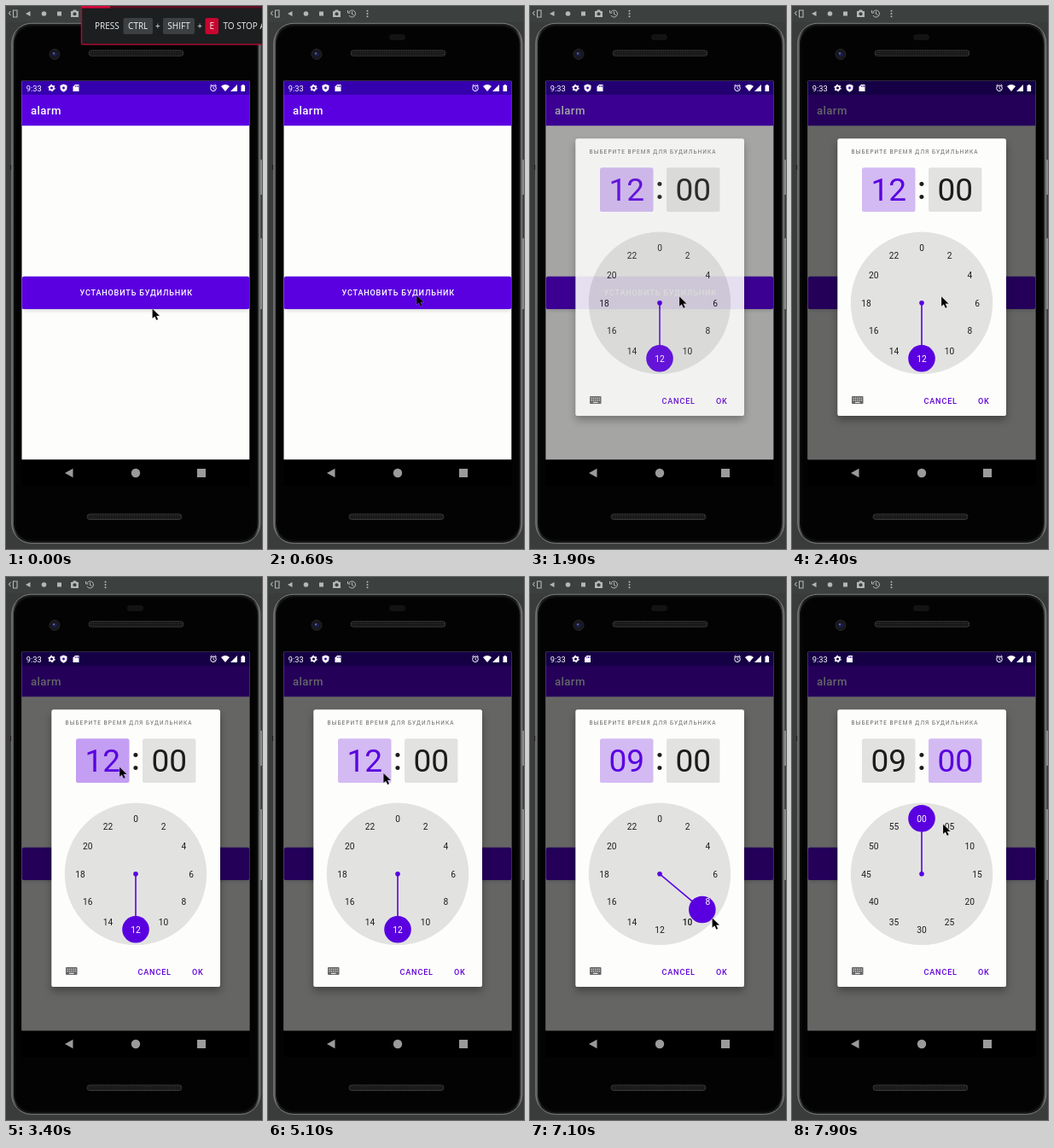
An HTML page for the animation above (8 s loop, 300 by 636 pixels).

```html
<!DOCTYPE html>
<html lang="ru">
<head>
<meta charset="utf-8">
<title>alarm</title>
<style>
  html, body { margin: 0; width: 100%; height: 100%; overflow: hidden; background: #393c3a; }
  svg { display: block; width: 300px; height: 636px; }
  text { font-family: Roboto, sans-serif; }
  .mid { text-anchor: middle; }
  .caps { font-size: 9.1px; font-weight: 500; letter-spacing: .81px; }
  .digits { font-size: 37px; text-anchor: middle; }
  .dial text { font-size: 10.2px; text-anchor: middle; }
  .banner text { font: 10px "Open Sans", sans-serif; fill: #f2f2f2; }
  #dialog { filter: drop-shadow(0 5px 5px rgba(0, 0, 0, .32)); }
</style>
</head>
<body>
<svg viewBox="0 0 300 636" xmlns="http://www.w3.org/2000/svg">
  <defs>
    <linearGradient id="rim" x1="0" y1="0" x2="1" y2="0">
      <stop offset="0" stop-color="#606361"/>
      <stop offset=".025" stop-color="#1c1d1d"/>
      <stop offset=".975" stop-color="#1c1d1d"/>
      <stop offset="1" stop-color="#666967"/>
    </linearGradient>
    <pattern id="mesh" width="2" height="2" patternUnits="userSpaceOnUse">
      <rect width="2" height="2" fill="#111"/>
      <rect width="1" height="1" fill="#3c3c3c"/>
    </pattern>
    <clipPath id="btnClip"><rect x="18.700" y="316.800" width="266.600" height="38.200" rx="2.600"/></clipPath>
    <clipPath id="knobClip"><circle id="knobHole" r="15.800"/></clipPath>
  </defs>

  <!-- emulator toolbar -->
  <rect width="300" height="636" fill="#393c3a"/>
  <rect width="300" height="19" fill="#3c403e"/>
  <g fill="#b4b6b8">
    <path d="M8.500 5h4.500v8h-4.500zM5.500 6l-2 2.500 2 2.500" fill="none" stroke="#b4b6b8" stroke-width="1.100"/>
    <path d="M23 9l5.500-3v6z"/>
    <circle cx="44.500" cy="9" r="2.800"/>
    <rect x="60" y="6.500" width="5" height="5"/>
    <path d="M76 6h2l1-1.500h3l1 1.500h2v7h-9z"/>
    <circle cx="80.500" cy="9.300" r="2" fill="#3c403e"/>
    <path d="M95 7a4 4 0 1 1 0 4M93.500 5v3h3M98.500 6.500v3l2 1" fill="none" stroke="#b4b6b8"/>
    <circle cx="116.500" cy="5.700" r="1"/><circle cx="116.500" cy="9" r="1"/><circle cx="116.500" cy="12.300" r="1"/>
  </g>

  <!-- phone -->
  <rect x="296" y="180" width="4" height="41" fill="#8a8c8b"/>
  <rect x="296" y="272" width="4" height="83" fill="#8a8c8b"/>
  <rect x="5" y="186" width="4" height="6" fill="#1d1d1d"/>
  <rect x="6.800" y="20.300" width="291" height="609" rx="23" fill="url(#rim)" stroke="#7e817f"/>
  <rect x="9.500" y="23" width="285.500" height="604" rx="21" fill="#060606" stroke="#111"/>
  <rect x="12" y="26" width="280.500" height="598" rx="18" fill="#030303"/>
  <rect x="142" y="33" width="19" height="7" rx="3.500" fill="#131314"/>
  <circle cx="57" cy="56.500" r="6" fill="#17181c" stroke="#24262a"/>
  <circle cx="57" cy="56.500" r="2.800" fill="#1c1d4a"/>
  <circle cx="56" cy="55.500" r="1" fill="#777cc0"/>
  <rect x="97" y="52" width="111" height="6.500" rx="3.200" fill="url(#mesh)" stroke="#333"/>
  <rect x="95" y="595" width="111" height="6.500" rx="3.200" fill="url(#mesh)" stroke="#333"/>
  <rect x="18.500" y="88" width="267" height="474" fill="#000"/>
  <g fill="#9b9b9b">
    <path d="M69 547l9.500-5.300v10.600z"/>
    <circle cx="152" cy="547" r="5.200"/>
    <rect x="224" y="542" width="10" height="10"/>
  </g>

  <!-- app -->
  <rect x="18.500" y="87.800" width="266.800" height="443.400" fill="#fdfefc"/>
  <rect x="18.500" y="87.800" width="266.800" height="16.200" fill="#3500ae"/>
  <rect x="18.500" y="104" width="266.800" height="36.200" fill="#5a00e0"/>
  <text x="29" y="126.800" font-size="13.200" font-weight="500" letter-spacing=".400" fill="#fff">alarm</text>
  <rect id="lift" x="20" y="319" width="264.500" height="38" rx="3" fill="#000" style="filter:blur(2px)"/>
  <rect x="18.700" y="316.800" width="266.600" height="38.200" rx="2.600" fill="#5a00e0"/>
  <g clip-path="url(#btnClip)"><circle id="ripple" cx="175" cy="340" fill="#f08ffc"/></g>
  <text class="mid caps" x="152.700" y="339.300" fill="#fff">УСТАНОВИТЬ БУДИЛЬНИК</text>
  <rect id="dim" x="18.500" y="87.800" width="266.800" height="443.400" fill="#000"/>

  <!-- status bar -->
  <g fill="#fff">
    <text x="23.800" y="99.500" font-size="9.300">9:33</text>
    <circle cx="53.500" cy="96" r="2.400" fill="none" stroke="#fff" stroke-width="1.700"/>
    <circle cx="53.500" cy="96" r="3.600" fill="none" stroke="#fff" stroke-width="1.200" stroke-dasharray="1.880 1.890"/>
    <g id="shield">
      <path d="M67.500 91.500l4 1.500v3q0 3-4 4.800q-4-1.800-4-4.800v-3z"/>
      <circle cx="67.500" cy="96" r="1.400" fill="#3500ae"/>
    </g>
    <g id="card">
      <path d="M81 92h4.500v8h-7v-5.500z"/>
      <path d="M81.300 93v2M83 93v2M84.500 93v2" stroke="#3500ae" stroke-width=".700"/>
    </g>
    <circle cx="243" cy="96.300" r="3.300" fill="none" stroke="#fff"/>
    <path d="M243 94.300v2.200l1.500 1M239.300 93.500l2-1.700M246.700 93.500l-2-1.700" fill="none" stroke="#fff" stroke-width=".900"/>
    <path d="M252 94q5-4 10 0l-5 6z"/>
    <path d="M263 100l8-8v8z"/>
    <path d="M275.500 93h1.300v-1h2v1h1.300v7h-4.600z"/>
  </g>

  <!-- time picker -->
  <g id="dialog">
    <rect x="53.300" y="155.300" width="197.700" height="324.700" rx="2.600" fill="#fdfefc"/>
    <text x="69.600" y="173" font-size="6.500" letter-spacing="1.080" fill="#666">ВЫБЕРИТЕ ВРЕМЯ ДЛЯ БУДИЛЬНИКА</text>
    <rect id="hourChip" x="82" y="189.300" width="62.500" height="51.700" rx="2.600"/>
    <rect id="minChip" x="160" y="189.300" width="62.500" height="51.700" rx="2.600"/>
    <text id="hour" class="digits" x="113.300" y="228.300"></text>
    <text class="digits" x="152" y="225.500" font-weight="500" fill="#1c1c1c">:</text>
    <text id="minute" class="digits" x="191.200" y="228.300">00</text>
    <circle cx="152" cy="347.800" r="83.200" fill="#e2e3e1"/>
    <g id="under" class="dial" fill="#1c1c1c"></g>
    <g fill="#5a00e0">
      <line id="hand" x1="152" y1="347.800" stroke="#5a00e0" stroke-width="1.600"/>
      <circle cx="152" cy="347.800" r="2.800"/>
      <circle id="knob" r="15.800"/>
    </g>
    <g clip-path="url(#knobClip)"><g id="over" class="dial" fill="#fff"></g></g>
    <rect x="70" y="457" width="13.500" height="9" rx="1" fill="#686868"/>
    <path d="M71.500 459.300h10.500M71.500 461.700h10.500" stroke="#fdfefc" stroke-width="1.100" stroke-dasharray="1.200 1.100"/>
    <path d="M74 464.300h5.500" stroke="#fdfefc"/>
    <g class="caps" fill="#6000d8">
      <text x="154.500" y="466.200">CANCEL</text>
      <text x="218" y="466.200">OK</text>
    </g>
  </g>

  <path id="cursor" d="M0 0v11.500l2.800-2.300 2 4.300 2-.900-2-4.200h3.900z" fill="#000" stroke="#fff" stroke-opacity=".500" stroke-width=".400"/>

  <g id="banner" class="banner">
    <rect x="88.500" y="0" width="220" height="45" rx="2" fill="#1c1e20" stroke="#a80d31" stroke-width="1.500"/>
    <rect x="88" width="212" height="2.500" fill="#5e0c20"/>
    <rect x="88" width="34" height="2.500" fill="#d8083a"/>
    <rect x="137.500" y="14" width="34.500" height="19" rx="2" fill="#3c4042"/>
    <rect x="184" y="14" width="37" height="19" rx="2" fill="#3c4042"/>
    <rect x="233.500" y="14" width="15.500" height="19" rx="2" fill="#c8062f"/>
    <text x="104" y="27">PRESS</text>
    <text class="mid" x="154.700" y="27">CTRL</text>
    <text class="mid" x="177.800" y="27">+</text>
    <text class="mid" x="202.500" y="27">SHIFT</text>
    <text class="mid" x="227" y="27">+</text>
    <text class="mid" x="241.300" y="27">E</text>
    <text x="254.500" y="27">TO STOP AND</text>
  </g>
</svg>
<script>
const LOOP = 8000, STEP = 100;
const CX = 152, CY = 347.8, R = 65;
const PRESS = 6100, RELEASE = 7300;
const $ = id => document.getElementById(id);
const set = (id, attrs) => {
  for (const k in attrs) $(id).setAttribute(k, attrs[k]);
};

// Each row: time, then one or more values.
const tracks = {
  cursor: [[0, 171.5, 354.5], [100, 232, 200], [200, 283, 42], [500, 283, 42],
    [600, 174, 338.5], [1300, 174, 338.5], [1400, 175, 340.3], [2600, 175, 340.3],
    [3200, 133, 222.5], [3500, 133, 222.5], [4000, 135.3, 229.7], [5100, 135.3, 229.7],
    [5500, 154, 424], [6100, 154, 424], [6500, 183, 420],
    [7000, 213.5, 399.3], [7500, 213.5, 399.3], [7800, 197, 338], [7900, 177, 289.5]],
  rippleSize: [[1300, 0], [1400, 40], [1600, 165]],
  rippleFade: [[1300, 0], [1400, .28], [1700, .28], [1900, 0]],
  lift: [[1300, .15], [1600, .32], [1700, .32], [1900, .15]],
  dim: [[1700, 0], [1800, .1], [1900, .35], [2000, .52], [2200, .6]],
  dialog: [[1700, 0], [1800, .35], [1900, .88], [2000, 1]],
  chip: [[3200, 0], [3400, 1], [3600, 1], [4000, 0]],
  shield: [[5600, 1], [5900, 0]],
  cardShift: [[5600, 0], [5900, -14.5]],
  turn: [[RELEASE, 135], [RELEASE + 200, 0]]
};

function at(name, t) {
  const keys = tracks[name];
  let i = keys.findIndex(k => k[0] > t);
  if (i < 0) i = keys.length;
  const a = keys[Math.max(i - 1, 0)], b = keys[Math.min(i, keys.length - 1)];
  const p = b[0] > a[0] ? (t - a[0]) / (b[0] - a[0]) : 0;
  const v = a.slice(1).map((n, j) => n + (b[j + 1] - n) * p);
  return v.length > 1 ? v : v[0];
}

const onDial = deg => {
  const r = deg * Math.PI / 180;
  return [CX + R * Math.sin(r), CY - R * Math.cos(r)];
};
const pad = n => String(n).padStart(2, "0");

const labels = ["under", "over"].flatMap(id => Array.from({ length: 12 }, (_, i) => {
  const node = document.createElementNS("http://www.w3.org/2000/svg", "text");
  const [x, y] = onDial(i * 30);
  node.setAttribute("x", x);
  node.setAttribute("y", y + 4);
  $(id).append(node);
  return { node, i, x, y };
}));

function handAngle(t, x, y) {
  if (t < PRESS) return 180;
  if (t >= RELEASE) return at("turn", t);
  return Math.atan2(x - CX, CY - y) * 180 / Math.PI;
}

function drawPicker(t, x, y) {
  const deg = handAngle(t, x, y), minutes = t >= RELEASE;
  const [kx, ky] = onDial(deg);
  set("hand", { x2: kx, y2: ky });
  for (const id of ["knob", "knobHole"]) set(id, { cx: kx, cy: ky });
  for (const l of labels) {
    const d = Math.hypot(l.x - kx, l.y - ky);
    l.node.textContent = minutes ? pad(l.i * 5) : l.i * 2;
    l.node.setAttribute("font-weight", d > 15 && d < 23.5 ? 500 : 400);
  }
  $("hour").textContent = pad(minutes ? 9 : Math.round(deg / 15));
  const p = at("chip", t);
  const on = `rgb(${211 - 16 * p},${186 - 28 * p},${243 - p})`;
  set("hourChip", { fill: minutes ? "#e2e3e1" : on });
  set("minChip", { fill: minutes ? on : "#e2e3e1" });
  set("hour", { fill: minutes ? "#1c1c1c" : "#5a00e0" });
  set("minute", { fill: minutes ? "#5a00e0" : "#1c1c1c" });
}

function draw(t) {
  const [x, y] = at("cursor", t);
  set("cursor", { transform: `translate(${x} ${y})` });
  set("banner", { visibility: t < 600 ? "visible" : "hidden" });
  set("ripple", { r: at("rippleSize", t), opacity: at("rippleFade", t) });
  set("card", { transform: `translate(${at("cardShift", t)} 0)` });
  for (const id of ["lift", "dim", "dialog", "shield"]) set(id, { opacity: at(id, t) });
  drawPicker(t, x, y);
}

function frame() {
  const t = performance.now() % LOOP;
  draw(Math.floor(t / STEP) * STEP);
  requestAnimationFrame(frame);
}
frame();
</script>
</body>
</html>
```
